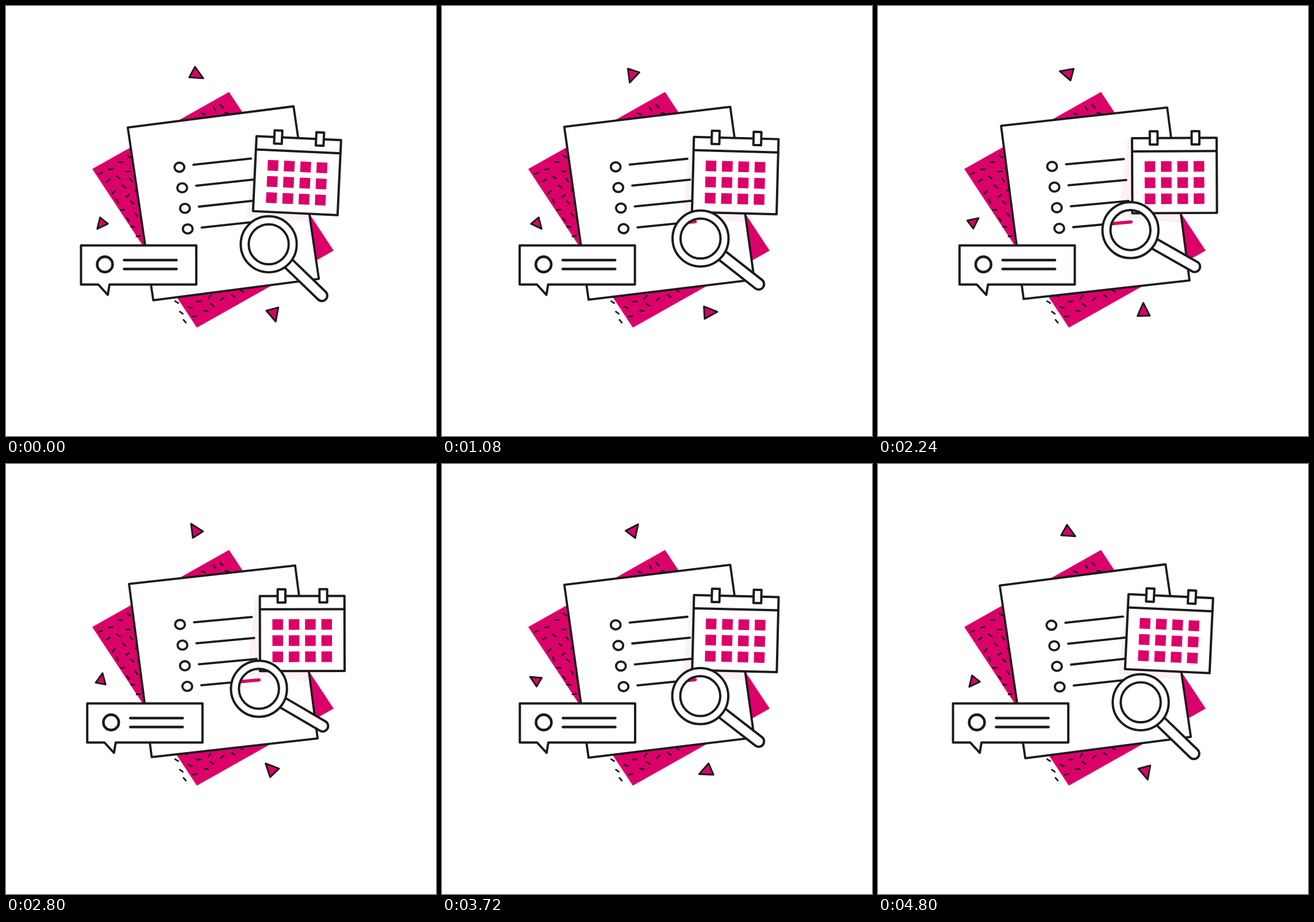
An HTML page with a canvas for the animation above (4880 ms loop, 748x748 px).

```html
<!DOCTYPE html>
<html lang="en">
<head>
<meta charset="utf-8">
<title>Planning</title>
<style>
  html, body { margin: 0; width: 100%; height: 100%; overflow: hidden; background: #fff; }
  canvas { display: block; }
</style>
</head>
<body>
<canvas id="stage" width="748" height="748"></canvas>
<script>
const ctx = document.getElementById('stage').getContext('2d');
const PINK = '#dc0069', INK = '#1b1b1b', TINT = '#fdf1f5', WHITE = '#fff';
const LOOP = 4880, STEP = 40, TAU = Math.PI * 2, DEG = Math.PI / 180;

function seededRandom(seed) {
  return () => (seed = (seed * 16807) % 2147483647) / 2147483647;
}

function polygon(points) {
  ctx.beginPath();
  points.forEach(p => ctx.lineTo(...p));
  ctx.closePath();
}

function paint(fill, width) {
  if (fill) { ctx.fillStyle = fill; ctx.fill('evenodd'); }
  if (width) { ctx.strokeStyle = INK; ctx.lineWidth = width; ctx.stroke(); }
}

function line(x1, y1, x2, y2, width, color = INK) {
  ctx.beginPath();
  ctx.moveTo(x1, y1);
  ctx.lineTo(x2, y2);
  ctx.strokeStyle = color;
  ctx.lineWidth = width;
  ctx.stroke();
}

function box(x, y, w, h, fill, width) {
  ctx.beginPath();
  ctx.rect(x, y, w, h);
  paint(fill, width);
}

function ellipse(x, y, rx, ry, fill, width) {
  ctx.beginPath();
  ctx.ellipse(x, y, rx, ry, 0, 0, TAU);
  paint(fill, width);
}

// Draws in a local frame at (x, y), turned by the given degrees
function place(x, y, degrees, draw) {
  ctx.save();
  ctx.translate(x, y);
  ctx.rotate(degrees * DEG);
  draw();
  ctx.restore();
}

function drawSheet() {
  polygon([[388, 149.5], [570, 425.5], [332, 559.5], [150, 283.5]]);
  paint(PINK);
  // Flecks scattered on a jittered grid along the sheet's edges
  const random = seededRandom(11), cell = 18.5;
  place(150, 283.5, -29.4, () => {
    for (let y = 14; y < 322; y += cell) {
      for (let x = 12; x < 264; x += cell) {
        const jitter = () => (random() - .5) * 6;
        place(x + jitter(), y + jitter(), random() * 130 - 30, () => line(-3.2, 0, 3.2, 0, 2.8));
      }
    }
  });
}

function listLine(row, width, color) {
  const x = 326 + 4.8 * row, y = 276.2 + 36.4 * row;
  line(x, y, x + 100.3, y - 10.8, width, color);
}

// The paper and its list tilt together about the paper's middle
function onPaper(sway, draw) {
  place(378, 343, sway, () => {
    ctx.translate(-378, -343);
    draw();
  });
}

function drawPaper(sway) {
  const outline = () => polygon([[211.8, 211.3], [500.2, 174.5], [544.2, 474.6], [256.2, 511.8]]);
  onPaper(sway, () => {
    outline();
    paint(WHITE);
    ctx.save();
    ctx.clip();
    polygon([[432, 230], [580, 242], [580, 380], [419, 366]]);
    paint(TINT);
    ctx.restore();
    outline();
    paint(null, 3.8);
    for (let row = 0; row < 4; row++) {
      ellipse(301.7 + 4.8 * row, 280.4 + 35.8 * row, 8.5, 7.9, WHITE, 3.8);
      listLine(row, 3.8);
    }
  });
}

function drawCalendar(sway) {
  place(506.3 + 9.6 * sway, 295.1 - .2 * sway, 2.7 - 3 * sway, () => {
    box(-73.6, -65.3, 147.2, 130.6, WHITE, 4);
    line(-73.6, -42.3, 73.6, -42.3, 4);
    for (const x of [-35.9, 36.8]) box(x - 6.7, -77, 13.4, 23, WHITE, 4);
    for (let i = 0; i < 12; i++) {
      box(-51.9 + 28.4 * (i % 4), -25 + 28.1 * Math.floor(i / 4), 18.5, 18.5, PINK);
    }
  });
}

function drawBubble(sway) {
  place(130.5 + 11.5 * sway, 416.5, 0, () => {
    polygon([[0, 0], [200.5, 0], [200.5, 68], [49.5, 68], [46.5, 86], [30, 68], [0, 68]]);
    paint(WHITE, 4);
    ellipse(41.5, 33, 13.4, 13.4, WHITE, 4.6);
    for (const y of [25.5, 41]) line(75, y, 166, y, 4.6);
  });
}

function drawMagnifier(sway) {
  const x = 457 - 18.1 * sway, y = 414.5 - 25 * sway;
  const rim = 48.7, glass = 34.8, grip = 9.4;

  place(x, y, 44 - 14.6 * sway, () => {
    ctx.beginPath();
    ctx.moveTo(47, -grip);
    ctx.arc(128.5, 0, grip, -TAU / 4, TAU / 4);
    ctx.lineTo(47, grip);
    paint(WHITE, 4);
  });

  // White rim with a see-through glass
  ctx.beginPath();
  ctx.arc(x, y, rim, 0, TAU);
  ctx.closePath();
  ctx.moveTo(x + glass, y);
  ctx.arc(x, y, glass, 0, TAU);
  paint(WHITE);

  // The last list line turns pink under the glass
  ctx.save();
  ctx.beginPath();
  ctx.arc(x, y, glass, 0, TAU);
  ctx.clip();
  onPaper(sway, () => listLine(3, 5.8, PINK));
  ctx.restore();

  for (const radius of [rim, glass]) ellipse(x, y, radius, radius, null, 4);
}

// Spins once per loop while swaying sideways three times
function drawTriangle(x, y, angle, size, direction, turn) {
  const drift = -direction * 1.7 * Math.cos(3 * turn);
  place(x + drift, y, angle + direction * turn / DEG, () => {
    polygon([[16.3, 0], [-5.9, 10.5], [-5.9, -10.5]].map(p => p.map(v => v * size)));
    paint(PINK, 3);
  });
}

function draw(time) {
  const t = Math.floor((time % LOOP) / STEP) * STEP;
  const turn = TAU * Math.min(1, Math.max(0, (t - STEP) / (LOOP - 3 * STEP)));
  const sway = (1 - Math.cos(turn)) / 2;

  ctx.fillStyle = WHITE;
  ctx.fillRect(0, 0, 748, 748);
  ctx.lineJoin = ctx.lineCap = 'round';
  drawSheet();
  drawPaper(sway);
  drawCalendar(sway);
  drawBubble(sway);
  drawMagnifier(sway);
  drawTriangle(330.6, 117.8, 29, 1, 1, turn);
  drawTriangle(165.6, 377.1, 129, .83, -1, turn);
  drawTriangle(463.2, 533, 75, 1.02, -1, turn);
}

const start = performance.now();
function tick() {
  draw(performance.now() - start);
  requestAnimationFrame(tick);
}
tick();
</script>
</body>
</html>
```
